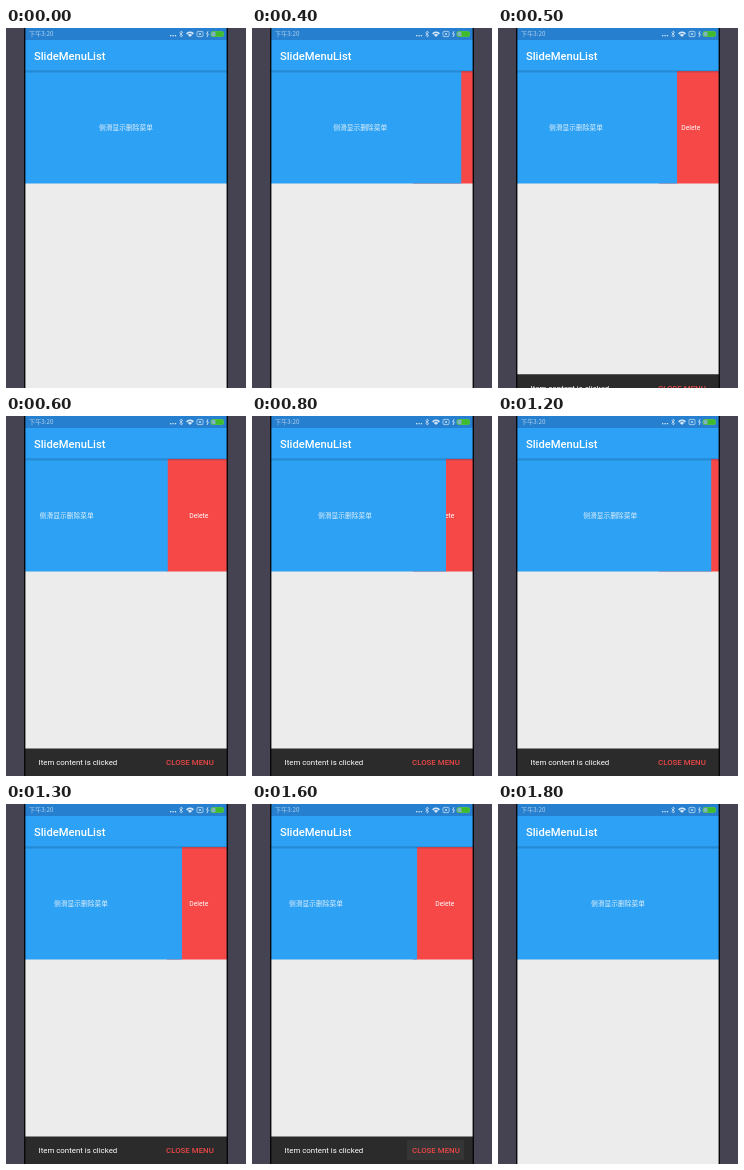
Write an HTML page with a canvas that moves like this. It is 240 px wide and 360 px high and loops after 1900 ms.

```html
<!DOCTYPE html>
<html lang="zh">
<head>
<meta charset="utf-8">
<title>SlideMenuList</title>
<style>
html, body { margin: 0; width: 100%; height: 100%; overflow: hidden; background: #454251; }
canvas { display: block; width: 240px; height: 360px; }
</style>
</head>
<body>
<canvas id="stage" width="240" height="360"></canvas>
<script>
const ctx = document.getElementById('stage').getContext('2d');
const LOOP = 1900, STEP = 100;
const LEFT = 19, RIGHT = 221, WIDTH = RIGHT - LEFT;
const ITEM_TOP = 43, ITEM_HEIGHT = 112.5;
const SNACK_TOP = 332.5, SNACK_HEIGHT = 360 - SNACK_TOP;
const MENU_OPEN = 59.2, PRESS_TIME = 1600;
const ROBOTO = 'Roboto, sans-serif';
const CJK = '"Noto Sans CJK SC", "Noto Sans CJK", sans-serif';
const ICON = '#d2e4f5', STATUS = '#2780cf';

// Smooth step from 0 to 1 between two times
function ease(time, from, to) {
  const u = Math.min(1, Math.max(0, (time - from) / (to - from)));
  return u * u * (3 - 2 * u);
}

// The menu is opened and closed twice per loop
function menuSlide(time) {
  const first = ease(time, 320, 600) - ease(time, 620, 960);
  const second = ease(time, 1150, 1370) - ease(time, 1570, 1780);
  return MENU_OPEN * (first + second);
}

function snackbarShown(time) {
  return ease(time, 400, 600) - ease(time, 1600, 1800);
}

function rect(x, y, w, h, color) {
  ctx.fillStyle = color;
  ctx.fillRect(x, y, w, h);
}

function text(str, x, y, font, color, align = 'left') {
  ctx.font = font;
  ctx.fillStyle = color;
  ctx.textAlign = align;
  ctx.fillText(str, x, y);
}

function line(points, width = 0.7) {
  ctx.lineWidth = width;
  ctx.beginPath();
  points.forEach(([x, y]) => ctx.lineTo(x, y));
  ctx.stroke();
}

function pill(x, y, w, h, r, color) {
  ctx.fillStyle = color;
  ctx.beginPath();
  ctx.roundRect(x, y, w, h, r);
  ctx.fill();
}

function wifiFan(radius, color) {
  ctx.fillStyle = color;
  ctx.beginPath();
  ctx.moveTo(184, 8.8);
  ctx.arc(184, 8.8, radius, -Math.PI * 0.77, -Math.PI * 0.23);
  ctx.fill();
}

function drawBattery() {
  pill(204.5, 3, 13.5, 6, 2.5, '#55bd50');
  pill(205.5, 4, 4.5, 4, 1.5, '#7fb2c4');
  pill(209.5, 3.8, 7.7, 4.4, 1.5, '#3fbc2c');
}

function drawStatusBar() {
  rect(LEFT, 0, WIDTH, 12, STATUS);
  text('下午3:20', 23, 8.3, `6.2px ${CJK}`, '#b4d2ee');
  for (let i = 0; i < 3; i++) rect(164 + i * 2.4, 7, 1.3, 1.3, ICON);

  ctx.strokeStyle = ICON;
  line([[173.5, 4.5], [176.7, 7.6], [175, 9], [175, 3], [176.7, 4.5], [173.5, 7.6]]);
  wifiFan(5.3, ICON);
  wifiFan(3.5, STATUS);
  wifiFan(2.8, ICON);

  ctx.beginPath();
  ctx.roundRect(191, 3.4, 6, 5.2, 1);
  ctx.stroke();
  line([[192.8, 4.8], [195.2, 7.2]]);
  line([[195.2, 4.8], [192.8, 7.2]]);
  line([[202, 3.2], [200.7, 6], [202.3, 6], [201, 9]], 0.9);
  drawBattery();
}

function drawToolbar() {
  rect(LEFT, 12, WIDTH, 31, '#2ca1f5');
  const shade = ctx.createLinearGradient(0, 42.5, 0, 45.5);
  shade.addColorStop(0, 'rgba(10,50,95,.3)');
  shade.addColorStop(1, 'rgba(10,50,95,0)');
  rect(LEFT, 42.5, WIDTH, 3, shade);
  text('SlideMenuList', 28, 31.8, `500 11.2px ${ROBOTO}`, '#fff');
}

function drawItem(slide) {
  if (slide > 0) {
    rect(RIGHT - MENU_OPEN - 1, ITEM_TOP, MENU_OPEN + 1, ITEM_HEIGHT, '#f74848');
    text('Delete', 192.8, 102, `6.75px ${ROBOTO}`, '#fff', 'center');
  }
  rect(LEFT, ITEM_TOP, WIDTH - slide, ITEM_HEIGHT, '#2da1f3');
  text('侧滑显示删除菜单', 120 - slide, 102, `6.75px ${CJK}`, '#e4f2fd', 'center');
}

function drawSnackbar(shown, pressed) {
  ctx.save();
  ctx.translate(0, SNACK_HEIGHT * (1 - shown));
  rect(LEFT, SNACK_TOP, WIDTH, SNACK_HEIGHT, '#2b2b2b');
  if (pressed) pill(155, 336, 57, 20, 1, '#353535');
  text('Item content is clicked', 32.5, 349, `7.86px ${ROBOTO}`, '#fff');
  text('CLOSE MENU', 207.8, 349, `500 7.86px ${ROBOTO}`, '#ee4747', 'right');
  ctx.restore();
}

function draw(time) {
  rect(0, 0, 240, 360, '#454251');
  rect(LEFT, 0, WIDTH, 360, '#ececec');
  drawItem(menuSlide(time));
  drawToolbar();
  drawStatusBar();
  const shown = snackbarShown(time);
  if (shown > 0) drawSnackbar(shown, time >= PRESS_TIME);

  // Dark rim of the phone screen
  rect(LEFT - 1, 0, 1.4, 360, '#08080c');
  rect(RIGHT - 0.4, 0, 1.4, 360, '#08080c');
}

const start = performance.now();
function tick() {
  const elapsed = (performance.now() - start) % LOOP;
  draw(Math.floor(elapsed / STEP) * STEP);
  requestAnimationFrame(tick);
}
tick();
</script>
</body>
</html>
```
